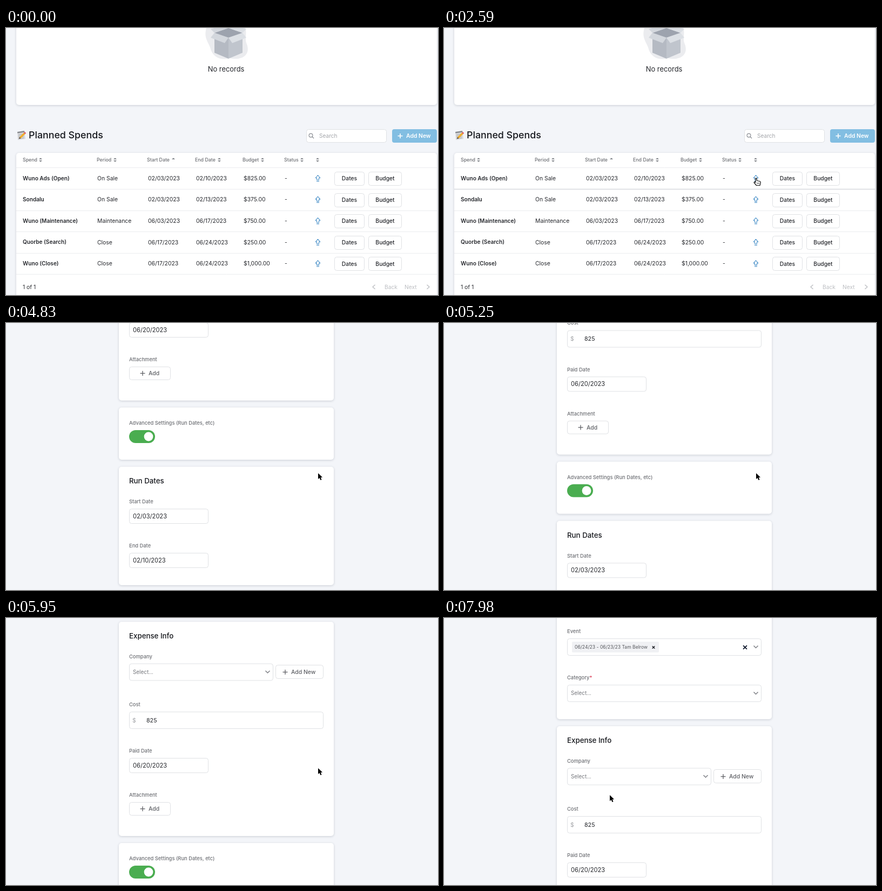
These frames come from a looping animation (800 by 496 pixels, 8000 ms). An HTML page with a canvas:

```html
<!DOCTYPE html>
<html lang="en">
<head>
<title>Planned spends</title>
<style>
  html, body { margin: 0; width: 100%; height: 100%; overflow: hidden; background: #f3f5f9; }
  canvas { display: block; }
</style>
</head>
<body>
<canvas id="stage" width="800" height="496"></canvas>
<script>
const ctx = document.getElementById('stage').getContext('2d');
const LOOP = 8000, STEP = 70, PAGE_CHANGE = 3430;
const INK = '#25272c', LABEL = '#6c6e73', BORDER = '#dfe1e4', PALE = '#bcbec2';

const easeInOut = p => p * p * (3 - 2 * p);
const easeOut = p => 1 - Math.pow(1 - p, 1.4);
const linear = p => p;

// Each key: [time, value, easing used to reach it].
function track(keys, t) {
  if (t <= keys[0][0]) return keys[0][1];
  for (let i = 1; i < keys.length; i++) {
    const [t0, a] = keys[i - 1], [t1, b, ease = linear] = keys[i];
    if (t < t1) return a + (b - a) * ease((t - t0) / (t1 - t0));
  }
  return keys[keys.length - 1][1];
}

// y is the middle of the capitals.
function text(str, x, y, size, color = INK, weight = 400, align = 'left') {
  ctx.font = `${weight} ${size}px Inter, "Open Sans", sans-serif`;
  ctx.fillStyle = color;
  ctx.textAlign = align;
  ctx.fillText(str, x, y + size * 0.36);
}

function roundRect(x0, y0, x1, y1, r) {
  ctx.beginPath();
  ctx.roundRect(x0, y0, x1 - x0, y1 - y0, r);
}

function poly(points, fill) {
  ctx.beginPath();
  points.forEach(([x, y]) => ctx.lineTo(x, y));
  ctx.closePath();
  if (fill) { ctx.fillStyle = fill; ctx.fill(); }
}

function line(points, color, width = 1) {
  ctx.beginPath();
  points.forEach(([x, y], i) => i ? ctx.lineTo(x, y) : ctx.moveTo(x, y));
  ctx.strokeStyle = color;
  ctx.lineWidth = width;
  ctx.stroke();
}

function card(x0, y0, x1, y1) {
  ctx.save();
  ctx.shadowColor = 'rgba(40, 50, 70, .2)';
  ctx.shadowBlur = 4;
  ctx.shadowOffsetY = 1;
  ctx.fillStyle = '#fff';
  roundRect(x0, y0, x1, y1, 5);
  ctx.fill();
  ctx.restore();
}

function box(x0, y0, x1, y1, r = 4) {
  roundRect(x0 + .5, y0 + .5, x1 - .5, y1 - .5, r);
  ctx.fillStyle = '#fff';
  ctx.fill();
  ctx.strokeStyle = BORDER;
  ctx.lineWidth = 1;
  ctx.stroke();
}

function plus(x, y, color, width = 1.3) {
  line([[x - 4.5, y], [x + 4.5, y]], color, width);
  line([[x, y - 4.5], [x, y + 4.5]], color, width);
}

function cross(x, y, r, color, width) {
  line([[x - r, y - r], [x + r, y + r]], color, width);
  line([[x - r, y + r], [x + r, y - r]], color, width);
}

const chevronDown = (x, y) => line([[x - 4, y - 2], [x, y + 2], [x + 4, y - 2]], '#85878c', 1.7);

function sortMark(x, y, upOnly) {
  poly([[x - 3, y - .9], [x + 3, y - .9], [x, y - 3.8]], '#7d8086');
  if (!upOnly) poly([[x - 3, y + .9], [x + 3, y + .9], [x, y + 3.8]], '#7d8086');
}

function uploadIcon(x, y) {
  poly([[x, y - 5.5], [x + 4.3, y - .5], [x + 2, y - .5], [x + 2, y + 3],
    [x - 2, y + 3], [x - 2, y - .5], [x - 4.3, y - .5]], '#fff');
  ctx.strokeStyle = '#4a91c9';
  ctx.lineWidth = 1.1;
  ctx.stroke();
  line([[x - 2.5, y + 5.5], [x + 2.5, y + 5.5]], '#4a91c9', 1.3);
}

function emptyBox() {
  ctx.fillStyle = '#ebecef';
  ctx.beginPath();
  ctx.moveTo(371, 0);
  ctx.bezierCurveTo(366, 18, 374, 25, 378, 36);
  ctx.bezierCurveTo(382, 54, 397, 61, 414, 56);
  ctx.bezierCurveTo(434, 61, 454, 52, 446, 30);
  ctx.bezierCurveTo(441, 20, 447, 10, 443, 0);
  ctx.fill();
  poly([[386, 9], [412, 18], [412, 57], [386, 46]], '#b5bac3');
  poly([[438, 9], [412, 18], [412, 57], [438, 46]], '#c0c5cd');
  poly([[386, 9], [412, 0], [438, 9], [412, 18]], '#9da3ae');
  poly([[386, 9], [412, 18], [405, 28], [379, 18]], '#d3d7dd');
  poly([[438, 9], [412, 18], [419, 28], [445, 18]], '#dce0e5');
  poly([[386, 9], [412, 0], [405, -6], [379, 2]], '#d3d7dd');
  poly([[438, 9], [412, 0], [419, -6], [445, 2]], '#dce0e5');
}

function memoIcon() {
  poly([[21, 193], [34, 191], [36, 206], [22, 208]], '#d9dadc');
  poly([[21, 193], [34, 191], [34.3, 193.5], [21.3, 195.5]], '#85888d');
  for (let y = 198; y < 206; y += 2.5) line([[23, y], [33, y - 1]], '#9fa2a8', .8);
  line([[26, 204], [35, 195]], '#f0ae2d', 3.6);
  line([[34, 196], [36, 194]], '#dd6670', 3.6);
  poly([[24, 206], [25, 202.5], [27.5, 205]], '#55463a');
}

const columns = [['Spend', 31, 64], ['Period', 168, 202], ['Start Date', 261, 310],
  ['End Date', 350, 395], ['Budget', 438, 475], ['Status', 515, 548], ['', 570, 577]];
const spends = [
  ['Wuno Ads (Open)', 'On Sale', '02/03/2023', '02/10/2023', '$825.00'],
  ['Sondalu', 'On Sale', '02/03/2023', '02/13/2023', '$375.00'],
  ['Wuno (Maintenance)', 'Maintenance', '06/03/2023', '06/17/2023', '$750.00'],
  ['Quorbe (Search)', 'Close', '06/17/2023', '06/24/2023', '$250.00'],
  ['Wuno (Close)', 'Close', '06/17/2023', '06/24/2023', '$1,000.00']
];
const cellX = [31, 169, 263, 352, 440];

function drawTable(hoverRow) {
  card(19, -20, 798, 143);
  emptyBox();
  text('No records', 407.5, 76, 12.9, INK, 400, 'center');

  memoIcon();
  text('Planned Spends', 42, 199, 17.8, '#16181d', 500);
  box(556, 188, 705, 213);
  ctx.beginPath();
  ctx.arc(564.5, 199.5, 3.4, 0, Math.PI * 2);
  ctx.strokeStyle = '#8b8e94';
  ctx.lineWidth = 1.2;
  ctx.stroke();
  line([[567, 202], [570, 205]], '#8b8e94', 1.3);
  text('Search', 580, 200, 10.1, '#a3a5aa');
  roundRect(715, 188, 798, 213, 4);
  ctx.fillStyle = '#82bee2';
  ctx.fill();
  plus(730, 200.5, '#fff', 1.6);
  text('Add New', 741, 200, 10.4, '#fff', 600);

  card(19, 232, 798, 520);
  for (const [name, x, markX] of columns) {
    text(name, x, 245, 8.8, LABEL, 500);
    sortMark(markX, 245, name === 'Start Date');
  }
  line([[19, 259.5], [798, 259.5]], '#ebecef');
  spends.forEach((cells, i) => {
    const y = 279 + i * 39.6, bottom = Math.round(y + 20) + .5;
    line([[19, bottom], [798, bottom]], i === hoverRow ? '#dfe1e5' : '#ebecef', i === hoverRow ? 2 : 1);
    cells.forEach((value, c) => text(value, cellX[c], y, c ? 10.4 : 10.1, INK, c ? 400 : 600));
    text('-', 516, y, 10.4);
    uploadIcon(577.5, y);
    const top = Math.round(y - 12);
    box(608, top, 664, top + 26);
    box(671, top, 733, top + 26);
    text('Dates', 636, y + .5, 10.3, INK, 500, 'center');
    text('Budget', 702, y + .5, 10.3, INK, 500, 'center');
  });
  text('1 of 1', 31, 481, 10.3, INK);
  line([[683.5, 477], [679, 481], [683.5, 485]], PALE, 1.4);
  text('Back', 701, 481, 10.2, PALE);
  text('Next', 738, 481, 10.2, PALE);
  line([[779.5, 477], [784, 481], [779.5, 485]], PALE, 1.4);
}

const label = (str, y) => text(str, 228, y, 9.35, LABEL, 500);
const heading = (str, y) => text(str, 228, y, 13.3, '#16181d', 500);

function dateField(name, y, value) {
  label(name, y);
  box(228, y + 13, 375, y + 41);
  text(value, 235, y + 27, 11.1);
}

function selectField(name, y, right, placeholder) {
  label(name, y);
  box(228, y + 13, right, y + 45);
  if (placeholder) text(placeholder, 235, y + 28.5, 9.9, '#74767b');
  chevronDown(right - 10.5, y + 28.5);
}

function drawForm(scroll) {
  ctx.save();
  ctx.translate(0, scroll);

  card(209, -420, 607, -6);
  selectField('Event', -169, 588);
  roundRect(237, -150, 398, -130, 2);
  ctx.fillStyle = '#f0f1f4';
  ctx.fill();
  text('06/24/23 - 06/23/23 Tam Belrow', 242, -140, 8.6, '#55575c');
  cross(388, -139.5, 2.3, '#24262c', 1.6);
  cross(557.5, -139.5, 3.4, '#172033', 2);
  selectField('Category', -83, 588, 'Select...');
  text('*', 269.5, -83, 9.35, '#d5304a', 500);

  card(209, 7, 607, 405);
  heading('Expense Info', 33);
  selectField('Company', 71.5, 495, 'Select...');
  box(499, 87, 588, 113);
  plus(517, 100.5, '#5d5f64');
  text('Add New', 528, 100, 10.4, '#5d5f64', 500);
  label('Cost', 160.5);
  box(228, 174, 588, 206);
  text('$', 234, 190, 10.4, '#a0a2a6');
  text('825', 260, 190, 10.7);
  dateField('Paid Date', 247, '06/20/2023');
  label('Attachment', 329);
  box(228, 342, 305, 367);
  plus(253, 354.5, '#5d5f64');
  text('Add', 264, 354.5, 10.4, '#5d5f64', 500);

  card(209, 418, 607, 515);
  label('Advanced Settings (Run Dates, etc)', 447);
  roundRect(228, 460, 276, 484, 12);
  ctx.fillStyle = '#4aad50';
  ctx.fill();
  ctx.beginPath();
  ctx.arc(264, 472, 8.4, 0, Math.PI * 2);
  ctx.fillStyle = '#fff';
  ctx.fill();

  card(209, 528, 607, 748);
  heading('Run Dates', 554.5);
  dateField('Start Date', 593, '02/03/2023');
  dateField('End Date', 675, '02/10/2023');

  card(209, 760, 607, 1000);
  heading('Trade', 787);
  label('Quantity', 825.5);
  box(228, 838, 588, 870);
  label('Value', 911.5);
  box(228, 925, 588, 957);
  ctx.restore();
}

function arrowCursor(x, y) {
  poly([[x, y], [x, y + 11], [x + 2.6, y + 8.7], [x + 4.5, y + 13], [x + 6.5, y + 12.1],
    [x + 4.7, y + 8], [x + 8, y + 7.8]]);
  ctx.lineJoin = 'round';
  ctx.strokeStyle = '#fff';
  ctx.lineWidth = 1.8;
  ctx.stroke();
  ctx.fillStyle = '#000';
  ctx.fill();
}

function handCursor(x, y) {
  poly([[x - 1, y], [x + 1, y], [x + 1.4, y + 4.5], [x + 7.5, y + 6], [x + 8.3, y + 8],
    [x + 7, y + 13.5], [x + .5, y + 13.5], [x - 4, y + 8], [x - 3, y + 6.6], [x - 1, y + 8]], '#fff');
  ctx.lineJoin = 'round';
  ctx.strokeStyle = '#111';
  ctx.lineWidth = 1.2;
  ctx.stroke();
  for (let i = 1; i < 4; i++) line([[x + i * 1.8, y + 8], [x + i * 1.8, y + 11]], '#333', .7);
}

const scrollKeys = [[4130, -436], [4270, -433], [4340, -433], [4830, -261],
  [5250, -160.5], [5950, 0], [6720, 194, easeOut]];
const cursorX = [[1190, 806], [2170, 578, easeInOut], [7070, 578], [7490, 390, easeInOut],
  [7560, 390], [7980, 307, easeInOut]];
const cursorY = [[1190, 325], [2170, 279, easeInOut], [7070, 279], [7490, 315, easeInOut],
  [7560, 315], [7980, 329, easeInOut]];

function draw(t) {
  ctx.fillStyle = '#f3f5f9';
  ctx.fillRect(0, 0, 800, 496);
  const x = track(cursorX, t), y = track(cursorY, t);
  if (t < PAGE_CHANGE) {
    drawTable(x < 798 ? Math.floor((y - 260) / 39.6) : -1);
    if (x < 583) handCursor(x, y);
    else arrowCursor(x, y);
  } else {
    drawForm(track(scrollKeys, t));
    arrowCursor(x, y);
  }
}

function frame() {
  const t = performance.now() % LOOP;
  draw(Math.floor(t / STEP) * STEP);
  requestAnimationFrame(frame);
}
frame();
</script>
</body>
</html>
```
